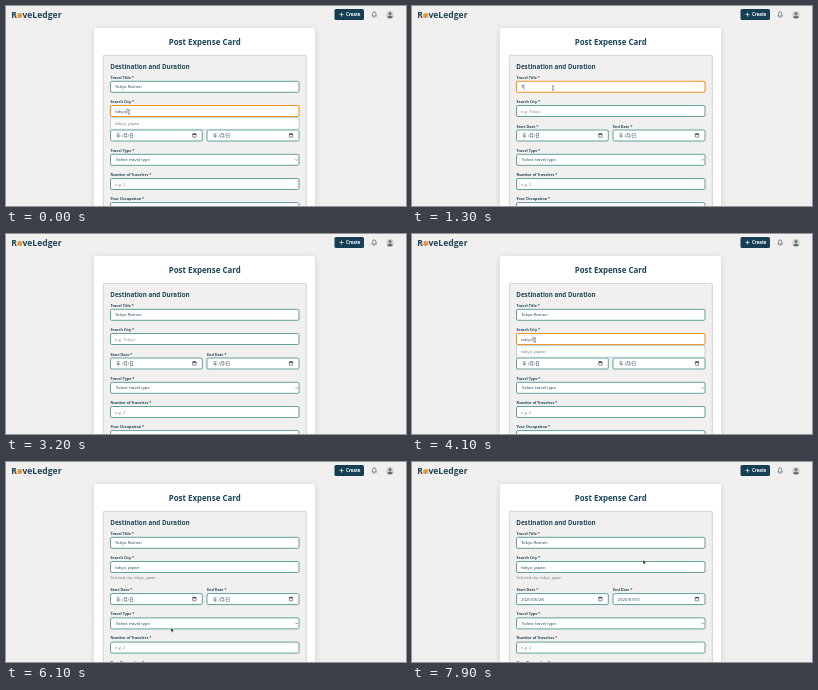
An HTML page that plays this animation: 400 px wide and 200 px high, repeating every 8000 ms.

```html
<!DOCTYPE html>
<html lang="en">
<head>
<meta charset="utf-8">
<title>Post Expense Card</title>
<style>
  html, body { margin: 0; width: 100%; height: 100%; overflow: hidden; background: #f1f0ee; }
  svg { display: block; width: 400px; height: 200px; }
  text { font-family: "Open Sans", "Noto Sans CJK JP", "Noto Sans CJK", sans-serif; white-space: pre; }
  .card { filter: drop-shadow(0 1px 3px #0002); }
</style>
</head>
<body>
<svg id="stage" viewBox="0 0 400 200"></svg>
<script>
const LOOP = 8000, INK = '#1d4558', TEAL = '#2f8580', ORANGE = '#ec9427', GREY = '#858b8f';
const stage = document.getElementById('stage');

const text = (x, y, size, str, fill = INK, weight = 400, extra = '') =>
  `<text x="${x}" y="${y}" font-size="${size}" fill="${fill}" font-weight="${weight}" ${extra}>${str}</text>`;
const rect = (x, y, w, h, r, fill, stroke = 'none', sw = .6) =>
  `<rect x="${x}" y="${y}" width="${w}" height="${h}" rx="${r}" fill="${fill}" stroke="${stroke}" stroke-width="${sw}"/>`;
const line = (d, stroke = INK, sw = .6, fill = 'none') =>
  `<path d="${d}" fill="${fill}" stroke="${stroke}" stroke-width="${sw}"/>`;

const label = (x, y, str) => text(x, y, 3.7, str + ' *', INK, 700);

function field(y, value, hint, focus, x = 104.5, w = 188.5) {
  return rect(x, y, w, 11, 1.4, '#fff', focus ? ORANGE : TEAL, focus ? 1.1 : .75) +
    text(x + 4.5, y + 7.1, 4.28, value || hint, value ? INK : GREY);
}

function dateField(x, w, iconX, y, value) {
  return field(y, value, '', false, x, w) +
    (value ? '' : text(x + 6, y + 7.1, 4.3, '年 /月/日')) +
    rect(iconX, y + 3.7, 3.4, 3.5, .3, 'none', '#222', .5) +
    line(`M${iconX} ${y + 4.2}h3.4`, '#222', 1);
}

const caret = (x, y) => line(`M${x} ${y}v5`, '#222', .5);

const typed = (str, t, start, step) =>
  str.slice(0, Math.max(0, Math.floor((t - start) / step) + 1));

// time, x, y of the pointer
const path = [
  [0, 123, 106], [100, 123, 106], [800, 141, 82], [3200, 141, 82], [3450, 123, 106],
  [4200, 123, 106], [4500, 126, 117], [5200, 191, 140], [5600, 191, 140],
  [5900, 165, 166], [6300, 165, 166], [6900, 285.5, 139], [7100, 285.5, 139],
  [7350, 252, 160], [7550, 252, 160], [7900, 231, 98], [8000, 231, 98]
];

function pointerAt(t) {
  const i = path.findIndex(p => p[0] > t);
  const [t0, x0, y0] = path[i - 1], [t1, x1, y1] = path[i];
  const p = (t - t0) / (t1 - t0), e = p * p * (3 - 2 * p);
  return [x0 + (x1 - x0) * e, y0 + (y1 - y0) * e];
}

function pointer(t) {
  if (t > 1450 && t < 3250) return '';
  const [x, y] = pointerAt(t);
  const beam = t < 100 || t > 650 && t < 1450 || t > 3400 && t < 4250;
  return `<g transform="translate(${x} ${y})">` + (beam
    ? line('M-1-2h2M0-2v4M-1 2h2', '#222', .5)
    : line('M0 0v4l1-.9.7 1.5.7-.3-.7-1.5h1.3z', '#fff', .3, '#111')) + '</g>';
}

const header =
  text(5.3, 12.4, 8.6, 'R', INK, 700) +
  `<circle cx="13.7" cy="9.6" r="2.5" fill="#e89339"/>` +
  text(16.4, 12.4, 8.6, 'veLedger', INK, 700) +
  rect(328.5, 3, 29.5, 11, 1.6, '#153f54') +
  line('M333.5 8.5h4M335.5 6.5v4', '#fff', .7) +
  text(340, 10.3, 4.4, 'Create', '#fff', 700) +
  line('M365.8 10.1c.9-.8.7-1.8.8-2.6a1.6 1.6 0 0 1 3.2 0c.1.8-.1 1.8.8 2.6zM367.5 11.3h1.4') +
  `<circle cx="384" cy="8.7" r="3.9" fill="#d5d7d2"/>` +
  line('M381 11.2q3-3.4 6 0q-3 2.7-6 0z', 'none', 0, '#587078') +
  `<circle cx="384" cy="7.5" r="1.6" fill="#6f7670"/>`;

const frame =
  `<g class="card">${rect(88, 22, 221, 200, 2.5, '#fff')}</g>` +
  text(198.7, 38.6, 7.9, 'Post Expense Card', INK, 700, 'text-anchor="middle"') +
  rect(97.3, 49.3, 203, 170, 1, '#f1f0ef', '#b5b9b9', .6) +
  text(104.3, 62.5, 6.25, 'Destination and Duration', INK, 700);

function render(t) {
  const opening = t < 100;
  const title = opening ? 'Tokyo Ramen' : typed('Tokyo Ramen', t, 1300, 130);
  const picked = t >= 4500;
  const city = opening ? 'tokyo' : picked ? 'tokyo, japan' : typed('tokyo', t, 3550, 100);
  const titleFocus = t >= 900 && t < 2900;
  const cityFocus = opening || t >= 3450 && t < 4500;
  const dropdown = opening || t >= 3950 && t < 4500;
  const dy = picked ? 7.6 : 0;

  stage.innerHTML = header + frame +
    label(104.5, 72.9, 'Travel Title') +
    field(75.3, title, 'e.g. Tokyo Trip', titleFocus) +
    (titleFocus ? caret(109.3 + title.length * 2.47, 78.3) : '') +
    label(104.5, 97.2, 'Search City') +
    field(99.5, city, 'e.g. Tokyo', cityFocus) +
    (cityFocus ? caret(109.3 + city.length * 2.35, 102.5) : '') +
    (picked ? text(104.5, 117, 3.75, 'Selected city: tokyo, japan', '#66757c') : '') +
    `<g transform="translate(0 ${dy})">` +
      label(104.5, 121.5, 'Start Date') +
      label(201, 121.5, 'End Date') +
      dateField(104.5, 91.8, 186.7, 124, t >= 6200 ? '2025/06/28' : '') +
      dateField(201, 92, 283.3, 124, t >= 7500 ? '2025/07/01' : '') +
      label(104.5, 145.8, 'Travel Type') +
      field(148.3, ' Select travel type', '', false) +
      line('M289.5 153.3l1.1 1.1 1.1-1.1', '#333', .5) +
      label(104.5, 169.9, 'Number of Travelers') +
      field(172.5, '', 'e.g. 2', false) +
      label(104.5, 194, 'Your Occupation') +
      field(196.6, '', '', false) +
    '</g>' +
    (dropdown ? rect(104.5, 111.7, 188.5, 11.6, 1, '#fff', '#8ebbb8', .6) +
      text(109, 119.1, 4.28, 'tokyo, japan', '#66757c') : '') +
    pointer(t);
}

function tick(now) {
  render(now % LOOP);
  requestAnimationFrame(tick);
}
render(0);
requestAnimationFrame(tick);
</script>
</body>
</html>
```
